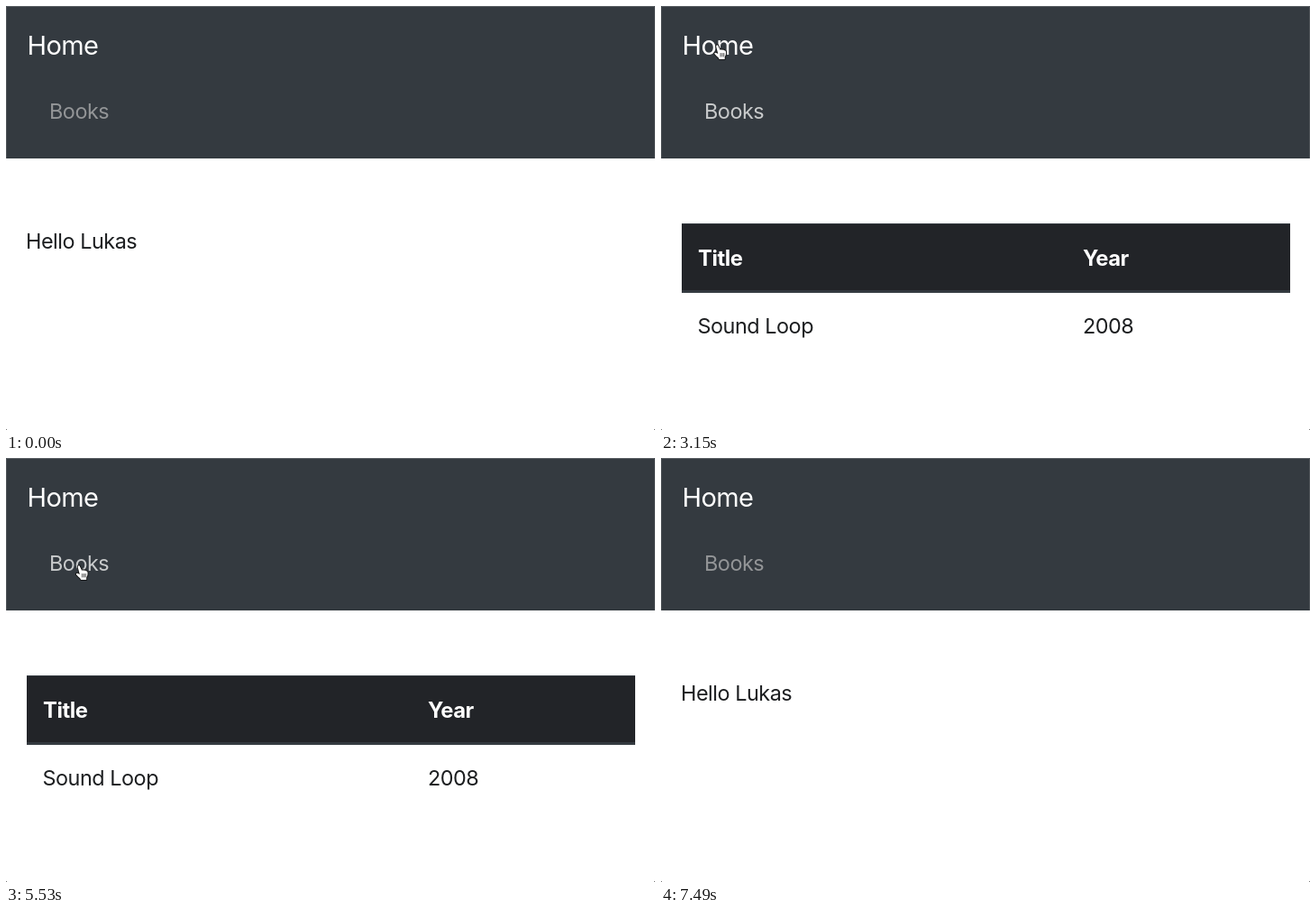
Write an HTML page with a canvas that moves like this. It is 720x470 px and loops after 7.77 s.

```html
<!DOCTYPE html>
<html lang="en">
<head>
<meta charset="utf-8">
<title>Books</title>
<style>
html, body { margin: 0; width: 100%; height: 100%; overflow: hidden; background: #fff; }
canvas { display: block; }
</style>
</head>
<body>
<canvas id="stage" width="720" height="470"></canvas>
<script>
const ctx = document.getElementById('stage').getContext('2d');
const LOOP = 7770, STEP = 70;
const NAV = '#343a40', INK = '#1c1e20', HEAD = '#222428', LINE = '#343a40';

// Pointer moves: start, end, x, y, easing
const out = p => 1 - (1 - p) ** 2.2;
const into = p => p ** 1.6;
const soft = p => p * p * (3 - 2 * p);
const START = [296, 430];
const MOVES = [
  [350, 630, 118, 130, out],
  [770, 1050, 62, 98, soft],
  [1050, 1260, 82, 121, soft],
  [1330, 1540, 74.5, 120.5, out],
  [2730, 3150, 62.5, 42.5, soft],
  [3850, 3920, 61.5, 42, soft],
  [4270, 4900, 79.5, 119, soft],
  [5460, 5530, 81, 118.5, soft],
  [5530, 6020, 64.5, 41, soft],
  [6860, 7490, 356, 474, into]
];
const RINGS = [[1890, 2100], [3500, 3640], [4900, 5040], [6090, 6230]];
const within = (t, [a, b]) => t >= a && t < b;

function pointerAt(t) {
  let [x, y] = START;
  for (const [a, b, nx, ny, ease] of MOVES) {
    if (t <= a) break;
    const p = ease(Math.min(1, (t - a) / (b - a)));
    x += (nx - x) * p;
    y += (ny - y) * p;
  }
  return { x, y };
}

function text(s, x, y, size, color, weight = 400) {
  ctx.font = `${weight} ${size}px Inter, "Open Sans", sans-serif`;
  ctx.letterSpacing = `${-0.02 * size}px`;
  ctx.fillStyle = color;
  ctx.fillText(s, x, y);
}

function rect(color, x, y, w, h) {
  ctx.fillStyle = color;
  ctx.fillRect(x, y, w, h);
}

function navbar(lit) {
  rect(NAV, 0, 0, 720, 169);
  rect('#5b6065', 0, 0, 720, 1);
  rect('#4e5358', 0, 0, 1, 169);
  rect('#4e5358', 719, 0, 1, 169);
  text('Home', 23.5, 54, 29, '#fff');
  text('Books', 48, 124.5, 23.4, lit ? '#c8cacb' : '#939597');
}

function table(loaded) {
  const year = loaded ? 468 : 411;
  rect(HEAD, 23, 241, 675, 77);
  rect(LINE, 23, 241, 675, 1);
  rect(LINE, 23, 315, 675, 3);
  text('Title', 41, 288, 23.8, '#fff', 700);
  text('Year', year, 288, 23.8, '#fff', 700);
  if (loaded) {
    text('Sound Loop', 40.5, 363, 23.4, INK);
    text('2008', year, 363, 23.4, INK);
  } else {
    text('Loading...', 22, 345, 23.4, INK);
  }
}

function page(t) {
  if (within(t, [2100, 3920])) table(t >= 2170);
  else if (within(t, [5110, 6580])) table(t >= 5180);
  else {
    const wait = within(t, [3920, 3990]) || within(t, [6580, 6650]);
    text(wait ? 'Loading...' : 'Hello Lukas', 22, 268.5, 23.4, INK);
  }
}

const ARROW = new Path2D('M0 0V15.5L3.6 12.2L6 17.6L8.6 16.5L6.2 11.2H11Z');
const HAND = new Path2D(
  'M-1.2 1.6Q-.6 .2 .6 .9L3.1 6.2Q4.2 5.1 5.4 6.2Q6.8 5.4 7.7 6.8' +
  'Q9.6 6.6 9.6 8.8Q9.8 12 8.2 14.2V16.4H2.1Q1.6 14.6 -.6 13.2' +
  'L-3.2 10.6Q-3.4 9 -1.6 9.2L.8 10.4L-1.2 3Z');
const FOLDS = new Path2D('M3.6 10V13.5M5.5 10V13.5M7.3 10V13.5');
const BEAM = new Path2D(
  'M-4 -9Q-.5 -9 0 -7Q.5 -9 4 -9M0 -7V7M-4 9Q-.5 9 0 7Q.5 9 4 9M-2 1.5H2');

function stroke(path, color, width) {
  ctx.strokeStyle = color;
  ctx.lineWidth = width;
  ctx.stroke(path);
}

function pointer(kind, x, y) {
  ctx.save();
  ctx.translate(x, y);
  ctx.lineJoin = ctx.lineCap = 'round';
  if (kind === 'beam') {
    stroke(BEAM, '#e8e8e8', 3);
    stroke(BEAM, '#222', 1.1);
  } else if (kind === 'hand') {
    stroke(HAND, '#111', 1.8);
    ctx.fillStyle = '#fff';
    ctx.fill(HAND);
    stroke(FOLDS, '#222', 0.8);
  } else {
    stroke(ARROW, '#fff', 2.2);
    ctx.fillStyle = '#000';
    ctx.fill(ARROW);
  }
  ctx.restore();
}

function ring(x, y) {
  const circle = new Path2D();
  circle.arc(x, y, 30.5, 0, 7);
  stroke(circle, 'rgba(0,0,0,.75)', 3);
}

function corners() {
  for (const x of [0, 719]) rect('#777', x, 469, 1, 1);
}

function draw(t) {
  const { x, y } = pointerAt(t);
  const overBooks = t >= 1400 && t < 7490 && y > 92 && y < 142;
  const overHome = t >= 1400 && y < 66 && x < 110;
  const focused = within(t, [1890, 3500]) || within(t, [4900, 6090]);
  rect('#fff', 0, 0, 720, 470);
  navbar(overBooks || focused);
  page(t);
  corners();
  if (!within(t, [350, 7490])) return;
  if (RINGS.some(r => within(t, r))) ring(x, y);
  const beam = within(t, [1190, 1400]);
  pointer(beam ? 'beam' : overBooks || overHome ? 'hand' : 'arrow', x, y);
}

function tick() {
  const t = performance.now() % LOOP;
  draw(Math.floor(t / STEP) * STEP);
  requestAnimationFrame(tick);
}
tick();
</script>
</body>
</html>
```
